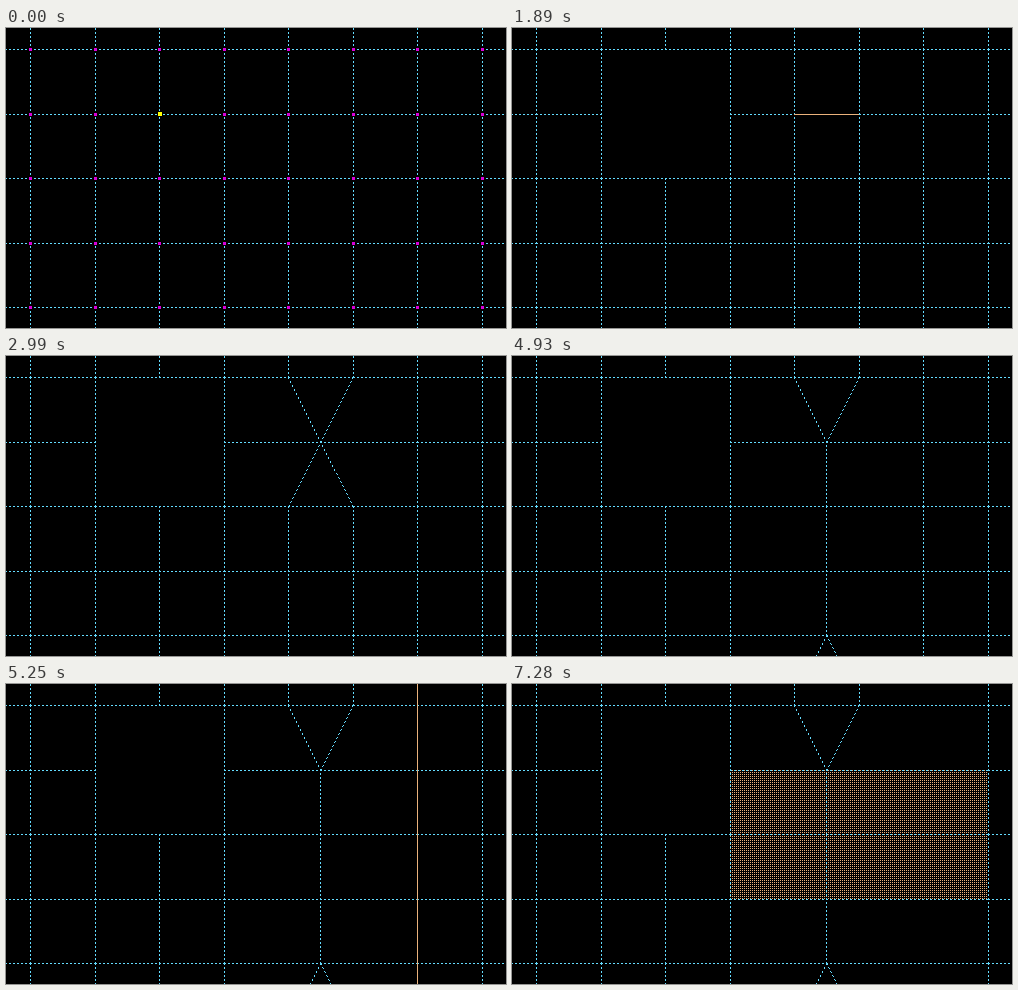
These frames come from a looping animation (500x300 px, 8000 ms). An HTML page with a canvas:

```html
<!DOCTYPE html>
<html lang="en">
<head>
<meta charset="utf-8">
<title>Mesh editing</title>
<style>
  html, body { margin: 0; width: 100%; height: 100%; overflow: hidden; background: #000; }
  canvas { display: block; width: 500px; height: 300px; image-rendering: pixelated; }
</style>
</head>
<body>
<canvas id="stage" width="500" height="300"></canvas>
<script>
const ctx = document.getElementById('stage').getContext('2d');
const LOOP = 8000;
const BLUE = '#64dcff', ORANGE = '#eab27c', MAGENTA = '#d800d8', YELLOW = '#ffff00';
const cols = [-41, 24, 89, 153, 218, 282, 347, 411, 476, 540];
const rows = [344, 279, 215, 150, 86, 21, -44];
const MID = 314;

// Moments at which the mesh or the selection changes
const T = { remove: 500, pickEdge: 1890, collapse: 2990, pickRing: 3920,
            collapseRing: 4930, pickLoop: 5250, dropLoop: 6730, pickFaces: 7280 };

function rect(x, y, w, h, color) {
  ctx.fillStyle = color;
  ctx.fillRect(x, y, w, h);
}

// Pixel line, two on and two off, with the phase restarting at each vertex
function dashed(x0, y0, x1, y1) {
  const dx = x1 - x0, dy = y1 - y0;
  const n = Math.max(Math.abs(dx), Math.abs(dy));
  for (let i = 0; i < n; i++) {
    if (i & 2) continue;
    rect(Math.round(x0 + dx * i / n), Math.round(y0 + dy * i / n), 1, 1, BLUE);
  }
}

function vertexX(x, y, t) {
  const merged = (y === 86 && t >= T.collapse) ||
                 (y >= 86 && y <= 279 && t >= T.collapseRing);
  return merged && (x === 282 || x === 347) ? MID : x;
}

function drawRow(y, t) {
  const xs = cols.filter(x => x !== 411 || t < T.dropLoop).map(x => vertexX(x, y, t));
  for (let i = 1; i < xs.length; i++) {
    const a = xs[i - 1], b = xs[i];
    if (t >= T.remove && y === 86 && a >= 89 && b <= 218) continue;
    dashed(a, y, b, y);
  }
}

function drawCol(x, t) {
  if (x === 411 && t >= T.dropLoop) return;
  for (let i = 1; i < rows.length; i++) {
    const a = rows[i - 1], b = rows[i];
    if (t >= T.remove && x === 153 && a <= 150 && b >= 21) continue;
    dashed(vertexX(x, a, t), a, vertexX(x, b, t), b);
  }
}

function drawMarkers(t) {
  for (const x of cols) for (const y of rows) {
    const active = x === 153 && y === 86;
    if (!active) rect(x - 1, y - 1, 3, 3, MAGENTA);
    else if (t < T.remove) rect(152, 84, 4, 4, YELLOW);
  }
}

// Stippled fill, one pixel in four
function drawFaces() {
  for (let y = 86; y < 215; y += 2)
    for (let x = 218; x < 475; x += 2) rect(x, y, 1, 1, ORANGE);
}

function draw(t) {
  const during = (from, to) => t >= from && t < to;
  const pickRow = y => rect(282, y, 65, 1, ORANGE);
  rect(0, 0, 500, 300, '#000');
  if (t >= T.pickFaces) drawFaces();
  rows.forEach(y => drawRow(y, t));
  cols.forEach(x => drawCol(x, t));
  if (t < T.pickEdge) drawMarkers(t);
  if (during(T.pickEdge, T.collapse)) pickRow(86);
  if (during(T.pickRing, T.collapseRing)) [150, 215, 279].forEach(pickRow);
  if (during(T.pickLoop, T.dropLoop)) rect(411, 0, 1, 300, ORANGE);
}

const start = performance.now();
function tick() {
  draw((performance.now() - start) % LOOP);
  requestAnimationFrame(tick);
}
tick();
</script>
</body>
</html>
```
